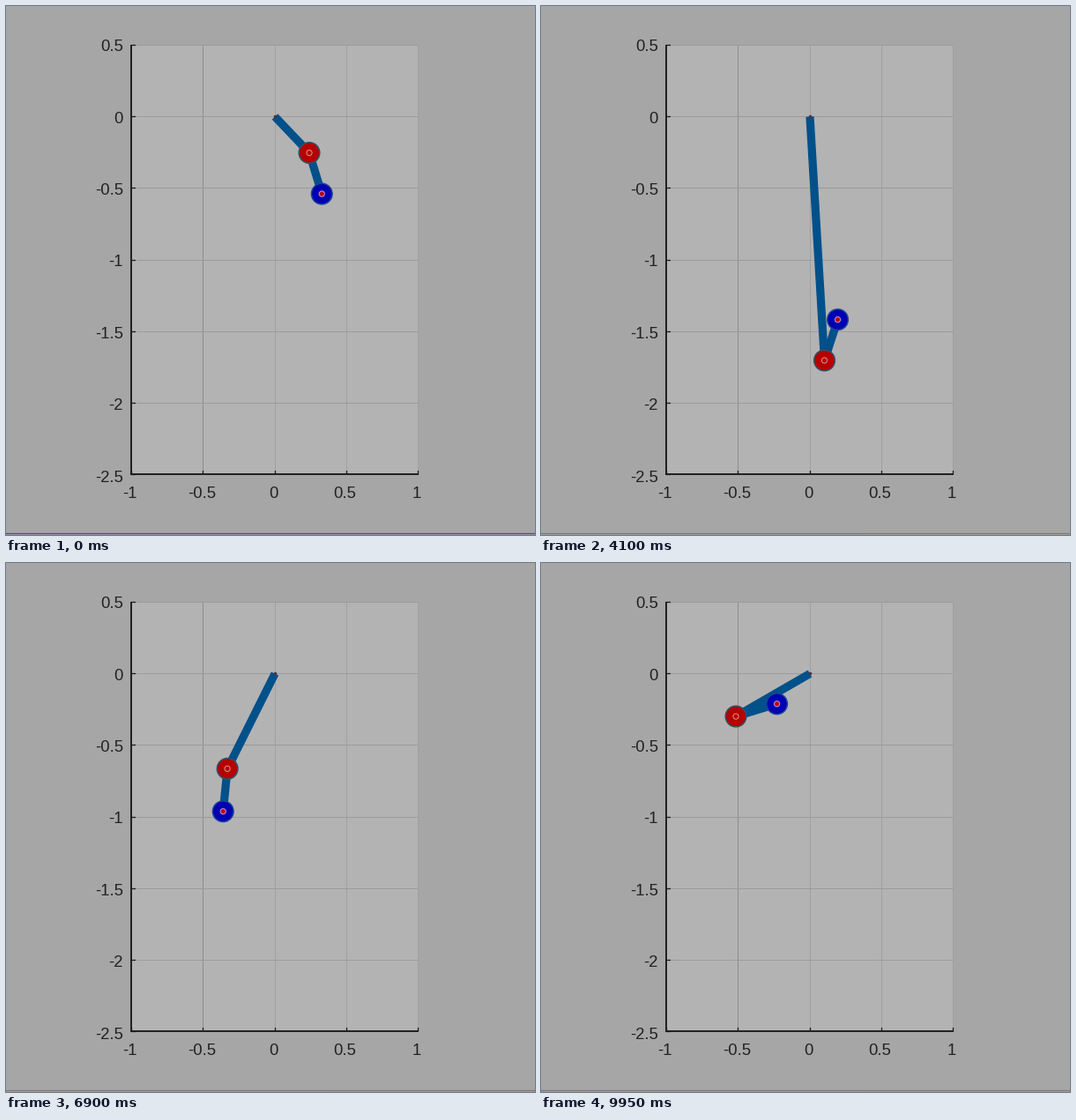
A matplotlib script that plays this animation: 600x600 px, repeating every 10 s.

```python
import numpy as np
import matplotlib.pyplot as plt
from matplotlib.animation import FuncAnimation
from matplotlib.patches import Circle, Rectangle

SIZE, FRAMES, STEP = 600, 200, 50
PX = 0.72  # points per pixel at 100 dpi
PIVOT = np.array([305.0, 125.5])
ARM = 48.7
LEFT, RIGHT, TOP, BOTTOM = 142, 467, 44, 531

# Key poses: time (s), joint x, joint y, angle of the lower arm from straight down
POSES = np.array([
    (0.00, 344, 166.5, 17),
    (1.50, 356, 250, 1.5),
    (2.65, 352, 349, 35),
    (4.10, 321.5, 402, 162),
    (5.80, 268.5, 314, 90.5),
    (8.05, 241, 169, -95),
    (9.05, 229.5, 151, -163),
    (9.95, 221, 174, -253),
])


def spline(t, knots, values):
    """Cubic spline per column, starting at rest and ending with no curvature."""
    n, h = len(knots), np.diff(knots)
    rate = np.diff(values, axis=0) / h[:, None]
    a, b = np.zeros((n, n)), np.zeros_like(values)
    a[0, 0] = 1
    a[-1, -2:] = 1, 2
    b[-1] = 3 * rate[-1]
    for i in range(1, n - 1):
        before, after = h[i - 1], h[i]
        a[i, i - 1:i + 2] = after, 2 * (before + after), before
        b[i] = 3 * (after * rate[i - 1] + before * rate[i])
    slope = np.linalg.solve(a, b)
    k = np.clip(np.searchsorted(knots, t, side="right") - 1, 0, n - 2)
    w = h[k][:, None]
    u = (t - knots[k])[:, None] / w
    v = 1 - u
    return (v * v * ((1 + 2 * u) * values[k] + u * w * slope[k])
            + u * u * ((1 + 2 * v) * values[k + 1] - v * w * slope[k + 1]))


times = np.arange(FRAMES) * STEP / 1000
joint_x, joint_y, angle = spline(times, POSES[:, 0], POSES[:, 1:]).T
tip_x = joint_x + ARM * np.sin(np.radians(angle))
tip_y = joint_y + ARM * np.cos(np.radians(angle))

fig = plt.figure(figsize=(6, 6), dpi=100, facecolor="#a6a6a6")
ax = fig.add_axes([0, 0, 1, 1])
ax.set(xlim=(0, SIZE), ylim=(SIZE, 0))
ax.axis("off")


def line(xs, ys, color, width, z=1):
    return ax.plot(xs, ys, color=color, lw=width * PX, zorder=z, snap=False,
                   solid_capstyle="butt", solid_joinstyle="miter")[0]


def label(x, y, value, align):
    ax.text(x, y, f"{value:g}", ha=align, va="baseline", color="#222222",
            family="Liberation Sans", fontsize=18.5 * PX)


def pixel_centers(start, end, count):
    return np.floor(np.linspace(start, end, count) + 0.5) + 0.5


def draw_plot():
    ax.add_patch(Rectangle((LEFT, TOP), RIGHT - LEFT, BOTTOM - TOP,
                           fc="#b3b3b3", lw=0))
    for i, x in enumerate(pixel_centers(LEFT, RIGHT, 5)):
        line([x, x], [TOP, BOTTOM], "#8c8c8c" if i == 1 else "#a0a0a0", 1)
        line([x, x], [BOTTOM, BOTTOM - 4], "#1c1c1c", 1.3, 2)
        label(140.7 + 81.25 * i, 558.5, -1 + i / 2, "center")
    for i, y in enumerate(pixel_centers(TOP, BOTTOM, 7)):
        line([LEFT, RIGHT], [y, y], "#9b9b9b", 1)
        line([LEFT, LEFT + 5], [y, y], "#1c1c1c", 1.3, 2)
        label(132.8, 51.2 + 81.4 * i, 0.5 - i / 2, "right")
    line([LEFT, LEFT], [TOP, BOTTOM + 1], "#1c1c1c", 1.9, 2)
    line([LEFT, RIGHT + 1], [BOTTOM, BOTTOM], "#1c1c1c", 1.9, 2)


def ball(fill, edge, core, ring):
    return [ax.add_patch(Circle((0, 0), 11.8, fc=fill, ec=edge, lw=1.5 * PX, zorder=5)),
            ax.add_patch(Circle((0, 0), 3.1, fc=core, ec=ring, lw=1.1 * PX, zorder=6))]


def move(parts, x, y):
    for part in parts:
        part.center = x, y


draw_plot()
strips = [line(span, [598.5, 598.5], "#5c4a78", 1.3) for span in ([0, 364], [364, SIZE])]
upper = line([], [], "#00508a", 9.2, 3)
lower = line([], [], "#00508a", 9.2, 3)
ax.add_patch(Circle(PIVOT + (0.5, 0), 1.8, fc="#5c2c40", lw=0, zorder=4))
red = ball("#b60000", "#2c5468", "#b60000", "#d88a80")
blue = ball("#0000b2", "#1c4498", "#b8001c", "#bc94c0")


def draw(i):
    jx, jy, tx, ty = joint_x[i], joint_y[i], tip_x[i], tip_y[i]
    upper.set_data([PIVOT[0], jx], [PIVOT[1], jy])
    lower.set_data([jx, tx], [jy, ty])
    move(red, jx, jy)
    move(blue, tx, ty)
    colors = ("#5c4a78", "#5c4a78") if times[i] < 1.8 else ("#787878", "#7e7c70")
    for strip, color in zip(strips, colors):
        strip.set_color(color)
    return [upper, lower, *red, *blue, *strips]


anim = FuncAnimation(fig, draw, frames=FRAMES, interval=STEP, repeat=True, repeat_delay=0)
plt.show()
```
